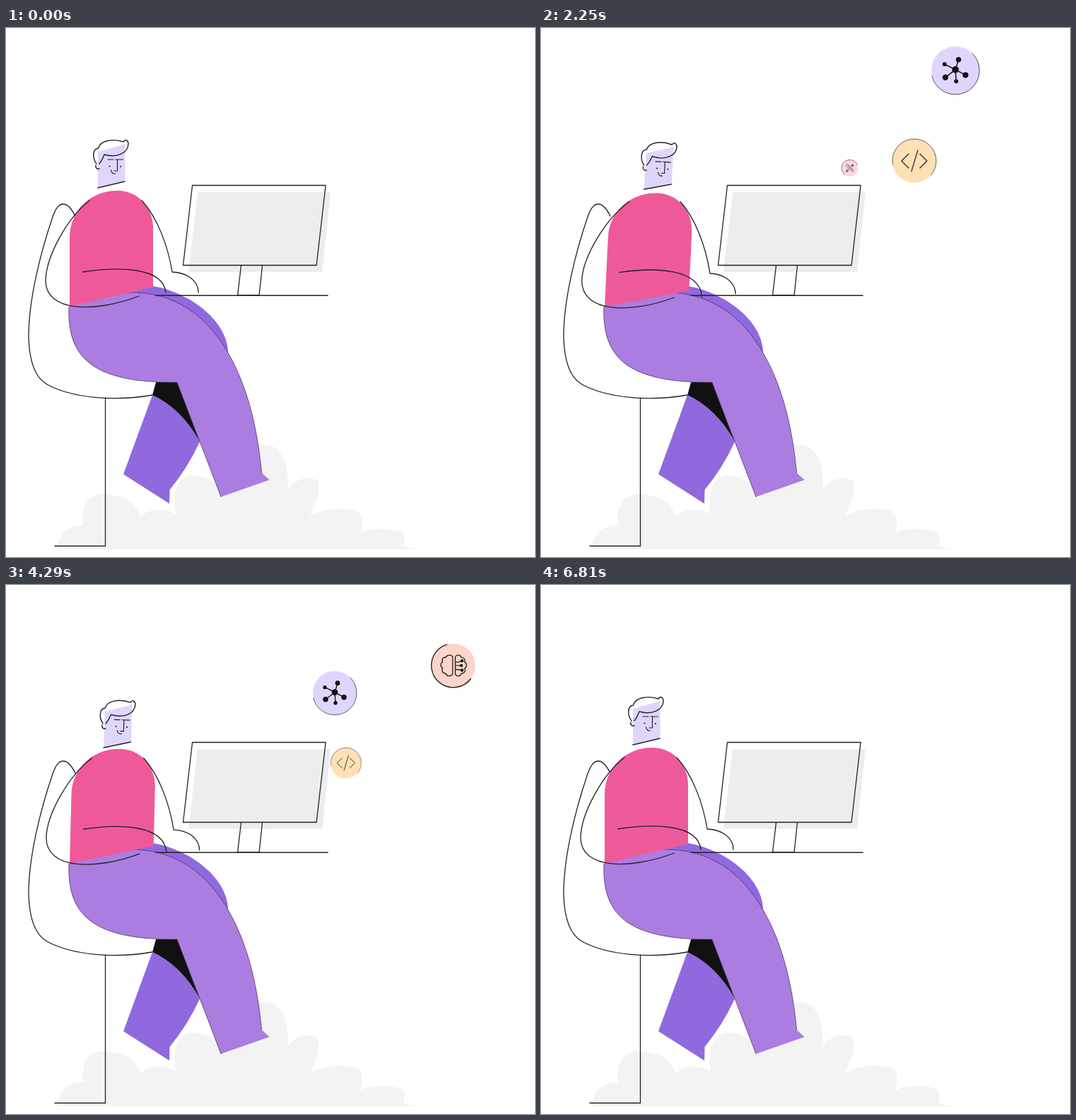
Write an HTML page with a canvas that moves like this. It is 748 px wide and 748 px high and loops after 6.87 s.

```html
<!DOCTYPE html>
<html>
<head>
<meta charset="utf-8">
<style>
  html, body { margin: 0; width: 100%; height: 100%; overflow: hidden; background: #fff; }
  canvas { display: block; width: 748px; height: 748px; }
</style>
</head>
<body>
<canvas id="stage" width="748" height="748"></canvas>
<script>
const ctx = document.getElementById('stage').getContext('2d');
const LOOP = 6870, STEP = 30, CYCLE = 2860, LEAN_CYCLE = 3435;
const POP = 1650, GONE = 1770;
const INK = '#222';

const clamp = v => Math.max(0, Math.min(1, v));
const ease = v => { v = clamp(v); return v * v * (3 - 2 * v); };

function fill(d, color) {
  ctx.fillStyle = color;
  ctx.fill(new Path2D(d));
}
function line(d, width = 1.3, color = INK) {
  ctx.lineWidth = width;
  ctx.strokeStyle = color;
  ctx.stroke(new Path2D(d));
}
function dot(x, y, r, color = '#111') {
  ctx.fillStyle = color;
  ctx.beginPath();
  ctx.arc(x, y, r, 0, 7);
  ctx.fill();
}
function placed(x, y, angle, scale, draw) {
  ctx.save();
  ctx.translate(x, y);
  ctx.rotate(angle);
  ctx.scale(scale, scale);
  draw();
  ctx.restore();
}

function scenery() {
  fill(`M72 737C74 718 84 703 109 703C106 674 118 659 136 659C160 660 184 666 190 691
    C203 678 228 679 240 688C234 650 246 633 265 633C284 634 296 641 300 652L340 610
    C352 588 367 586 379 593C396 603 399 628 399 651C409 637 429 633 441 640
    C446 654 437 674 430 690C450 677 490 677 501 687C505 696 504 704 501 714
    C520 706 548 708 560 713C565 720 564 727 562 733L585 737Z`, '#f3f3f3');
  line('M98 266C92 254 87 249 81 249C74 249 70 256 66 267C48 320 32 385 32 437C33 475 42 495 58 504C95 524 155 528 207 519');
  line('M140.500 523V732.500H69');
}

function legs() {
  fill('M160 378L208 365C260 374 316 415 314 463L240 440Z', '#9069de');
  fill('M207 519L166 631L231 672.500L231.500 653Q257 622 274 585Q248 538 207 519Z', '#9069de');
  fill('M212 501H242L274 585Q248 538 207 519Z', '#111');
  fill(`M89 394C86 466 122 502 242 501L304 663L372.500 639L361.500 629
    C355 560 340 505 315 461C284 406 237 372 172 374L120 380Z`, '#ab7de0');
  line('M89 394C86 466 122 502 242 501L304 663M361.500 629C355 560 340 505 315 461C284 406 237 372 172 374', .8, '#4b3568');
  ctx.setLineDash([5, 4]);
  line('M152 411C157 448 181 471 216 486M222 414Q268 430 310 459M306 505Q330 545 341 590M310 605L325 642', .6, '#9f72d4');
  ctx.setLineDash([]);
}

function desk() {
  fill('M271 232H459L447 345H258Z', '#ecedef');
  line('M263.500 222.500H452L439 335.500H250.500ZM332.500 335.500H362.500L358 378H327.500Z');
  line('M212 378.300H455', 1.4);
}

function torso(lean) {
  placed(90, 394, lean * .049, 1, () =>
    fill('M0 0V-98C0 -136 30 -164 67 -164C100 -164 118 -137 118 -111V-28Z', '#ee5a99'));
}

// lean: 0 upright to 1 forward; reach: 0 hand at rest to 1 pushed ahead
function arms(lean, reach) {
  const p = (x, y, lx, ly, rx = 0, ry = 0) =>
    `${x + lx * lean + rx * reach} ${y + ly * lean + ry * reach} `;
  line('M' + p(118, 244, 7, 1.5, -4, 3)
    + 'C' + p(87, 268, 5, 1, 2, 4) + p(57, 322, 2, 1, 8, 4) + p(56, 357, 1.6, .5, 7.6, 5)
    + 'C' + p(56, 402, 2, 1, 8, 7) + p(125, 403, 2, 1, 9, 5) + p(188.500, 379, 0, 2, 10, -1));
  line('M' + p(108.500, 345, 2, .5, 6, 5)
    + 'C' + p(160, 337, 2, 1, 7, 4) + p(222, 338, 2, 2, 8, 2) + p(226, 374, 1.5, 6, 8.5, -6));
  line('M' + p(192, 244, 5, 1.5) + 'C' + p(214, 268, 5, 2) + p(229, 308, 4, 2) + p(235, 345, 4, 2)
    + 'C' + p(256, 346, 3, 2) + p(272, 357, 3, 2) + p(272, 374, 3, 2));
}

function head(lean) {
  const dip = 3 * lean + 3 * Math.sin(Math.PI * lean);
  placed(149 + 16 * lean, 221 + dip, lean * .055, 1, () => {
    ctx.translate(-149, -221);
    fill('M130 175L168.500 164V217L130 226Z', '#e0d6fd');
    line('M130 226L168 217', 1.5);
    line(`M128 192C122 184 122 171 130.500 170C133 159 151 156 166 161C168 157 172 158 173 163
      C173 177 157 184 139 179Q136 187 132 192M127 194C126 198 129 200 132 199`, 1.4);
    line('M144 186H152M155 186H165.500M157.500 186V202H153M148.500 201Q149 206 154.500 206', 1.2);
    dot(146.500, 195.500, 1);
    dot(162, 196, 1);
  });
}

function brain() {
  placed(0, 0, 0, .95, () => {
    line(`M-1 -13V13C-4 17 -10 16 -11 12C-16 12 -18 8 -16 4C-20 1 -19 -4 -16 -5
      C-18 -10 -14 -13 -11 -12C-10 -16 -3 -17 -1 -13Z
      M3 -13C5 -17 11 -16 12 -12C17 -12 18 -8 17 -5C21 -3 20 3 17 4C19 9 16 12 12 12C11 16 5 17 3 13Z
      M3 0H12M3 6H8L12 7M3 -5H8L12 -7`, 1.4);
    for (const [x, y] of [[13, -7], [12, 0], [13, 7]]) dot(x, y, 2.3);
  });
}
function nodes() {
  const ends = [[4, -14, 3.4], [-14, -8, 2.6], [-13, 9, 3.8], [13, 6, 3.7], [1, 14, 2.7]];
  for (const [x, y, r] of ends) {
    line(`M0 -1L${x} ${y}`, 1.4, '#111');
    dot(x, y, r);
  }
  dot(0, -1, 4.4);
}
function code() {
  line('M-8 -10L-18 0L-8 10M8 -10L18 0L8 10M5 -15L-4 15', 1.4, '#333');
}
function tools() {
  placed(0, 0, Math.PI / 4, .95, () => {
    line('M-18 -4H18V4H-18ZM-14 -4V0M-10 -4V-1M-6 -4V0M6 -4V-1M10 -4V0M14 -4V-1', 1.3);
  });
  placed(0, 0, -Math.PI / 4, .95, () => {
    fill('M-20 0L-14 -3.500H18V3.500H-14Z', '#ffd6e6');
    line('M-20 0L-14 -3.500H18V3.500H-14ZM-14 0H14', 1.2);
    fill('M-20 0L-14 -3.500V3.500ZM14 -3.500H17Q20 0 17 3.500H14Z', '#222');
  });
}

// start point, delay, disc colour, outline from/to in degrees and width
const badges = [
  { x: 500, y: 228, delay: 0, color: '#fbd5ca', from: 37, to: 253, width: 1.4, glyph: brain },
  { x: 435.5, y: 199, delay: 630, color: '#e0d6fd', from: -45, to: 167, width: .7, glyph: nodes },
  { x: 479, y: 253, delay: 1300, color: '#fee0b4', from: 170, to: 400, width: .7, glyph: code },
  { x: 435.5, y: 199, delay: 2170, color: '#ffd6e6', from: 128, to: 335, width: 1.4, glyph: tools }
];

// time, x, y along the shared flight path
const flight = [[0, 0, 0], [250, 4, -4.5], [690, 19, -34], [940, 47.5, -64], [1140, 77, -84],
  [1420, 131, -113], [1620, 150.500, -139], [1660, 152, -144]];

function along(time, axis) {
  const at = i => flight[Math.max(0, Math.min(flight.length - 1, i))];
  let i = 0;
  while (i < flight.length - 2 && time > flight[i + 1][0]) i++;
  const a = at(i), b = at(i + 1), span = b[0] - a[0];
  const slope = k => (at(k + 1)[axis] - at(k - 1)[axis]) / (at(k + 1)[0] - at(k - 1)[0]);
  const u = clamp((time - a[0]) / span), v = 1 - u;
  return a[axis] * v * v * (1 + 2 * u) + b[axis] * u * u * (3 - 2 * u)
    + span * u * v * (v * slope(i) - u * slope(i + 1));
}

function burst(x, y, p) {
  const outer = 26 + 19 * (1 - (1 - p) ** 2);
  const length = 11 * Math.sin(Math.PI * (.15 + .78 * p));
  for (let i = 0; i < 6; i++) {
    placed(x, y, (i * 60 + 30) * Math.PI / 180, 1, () => {
      const end = outer - (i % 3 === 1 ? 1 : 0);
      line(`M${end - length} 0H${end}`, 1.6);
    });
  }
}

function badge(b, time) {
  if (time < 40 || time >= GONE) return;
  if (time >= POP) return burst(b.x + 152, b.y - 144, (time - POP) / (GONE - POP));
  const grow = Math.sin(clamp((time - 30) / 195) * Math.PI / 2);
  const swell = 3 * ease((time - 1510) / 110);
  const radius = 30 * grow + ease((time - 250) / 300) + swell;
  placed(b.x + along(time, 1), b.y + along(time, 2), 0, radius / 31, () => {
    dot(0, 0, 31, b.color);
    ctx.lineWidth = b.width;
    ctx.strokeStyle = INK;
    ctx.beginPath();
    ctx.arc(0, 0, 31, b.from * Math.PI / 180, b.to * Math.PI / 180);
    ctx.stroke();
    b.glyph();
  });
}

function draw(t) {
  const u = t % LEAN_CYCLE;
  const lean = ease((u - 200) / 1280) - ease((u - 2250) / 840);
  const beat = t < 1220 ? 0 : (t - 1220) % 640;
  const reach = beat < 400 ? Math.sin(Math.PI * beat / 400) ** 2 : 0;

  ctx.fillStyle = '#fff';
  ctx.fillRect(0, 0, 748, 748);
  scenery();
  legs();
  desk();
  torso(lean);
  arms(lean, reach);
  head(lean);
  for (const b of badges) {
    badge(b, t - b.delay);
    badge(b, t - b.delay - CYCLE);
  }
}

const begin = performance.now();
function tick() {
  const t = (performance.now() - begin) % LOOP;
  draw(Math.min(LOOP - 60, Math.floor(t / STEP) * STEP));
  requestAnimationFrame(tick);
}
ctx.lineCap = 'round';
ctx.lineJoin = 'round';
tick();
</script>
</body>
</html>
```
